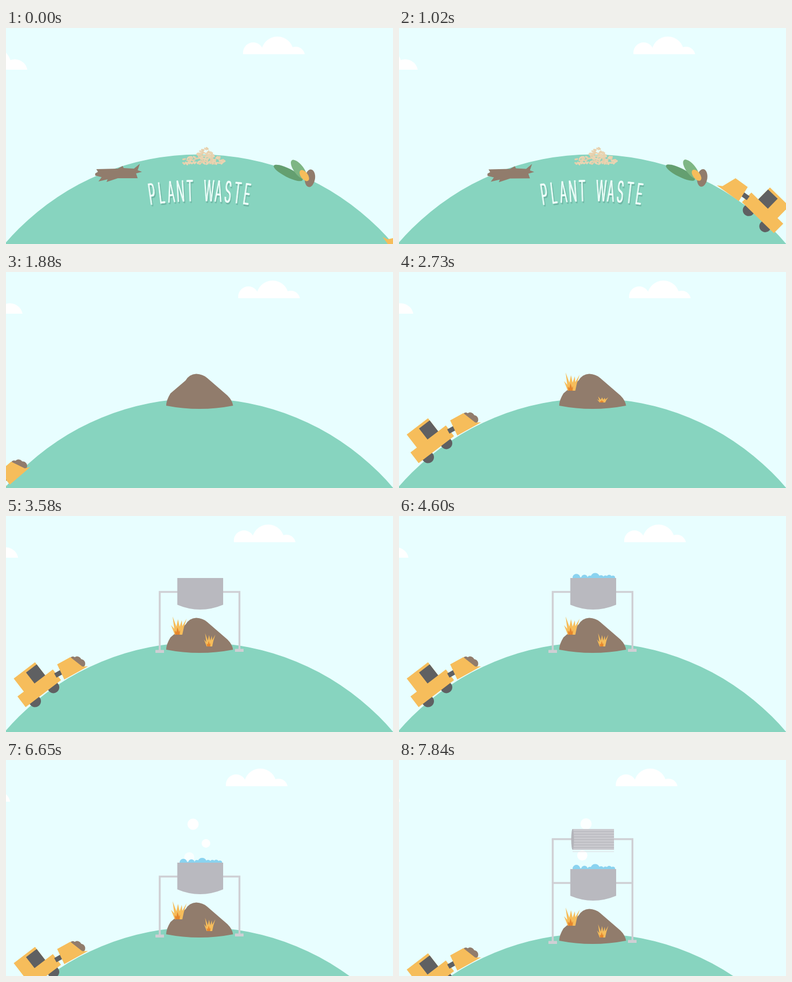
An HTML page with a canvas that plays this animation: 720x404 px, repeating every 8000 ms.

```html
<!DOCTYPE html>
<html lang="en">
<head>
<meta charset="utf-8">
<title>Plant waste</title>
<style>
  html, body { margin: 0; width: 100%; height: 100%; overflow: hidden; background: #e8feff; }
  canvas { display: block; width: 720px; height: 404px; }
</style>
</head>
<body>
<canvas id="stage" width="720" height="404"></canvas>
<script>
const ctx = document.getElementById('stage').getContext('2d');
const LOOP = 8000;
const GLOBE = { x: 359, y: 710, r: 473.6 };
const C = {
  sky: '#e8feff', hill: '#87d4bf', brown: '#917c6c', yellow: '#f6bd5b', orange: '#e5862d',
  dark: '#5f6062', pot: '#b9b9bf', stand: '#cfcfd4', water: '#8ad3f0', husk: '#ead4b2'
};

const clamp = v => Math.max(0, Math.min(1, v));
const span = (t, from, to) => clamp((t - from) / (to - from));
const easeOut = p => 1 - (1 - p) ** 2;
const easeInOut = p => p < 0.5 ? 4 * p ** 3 : 1 - (2 - 2 * p) ** 3 / 2;

function fill(color, path) {
  ctx.fillStyle = color;
  ctx.fill(new Path2D(path));
}

function rect(color, x, y, w, h) {
  ctx.fillStyle = color;
  ctx.fillRect(x, y, w, h);
}

function ellipse(color, x, y, rx, ry = rx, deg = 0) {
  ctx.fillStyle = color;
  ctx.beginPath();
  ctx.ellipse(x, y, rx, ry, deg * Math.PI / 180, 0, 2 * Math.PI);
  ctx.fill();
}

function group(draw) {
  ctx.save();
  draw();
  ctx.restore();
}

function shift(x, y, draw) {
  group(() => {
    ctx.translate(x, y);
    draw();
  });
}

function spin(deg, draw, x = GLOBE.x, y = GLOBE.y) {
  group(() => {
    ctx.translate(x, y);
    ctx.rotate(deg * Math.PI / 180);
    ctx.translate(-x, -y);
    draw();
  });
}

// Draws with the origin on the globe's surface, at an angle from its top.
function onSurface(deg, draw) {
  spin(deg, () => shift(GLOBE.x, GLOBE.y - GLOBE.r, draw));
}

function cloud(x, y, scale) {
  shift(x, y, () => {
    ctx.scale(scale, scale);
    ctx.beginPath();
    ctx.rect(-5, -50, 130, 50);
    ctx.clip();
    ellipse('#fff', 19, -3, 19);
    ellipse('#fff', 64, -3, 30);
    ellipse('#fff', 98, 3, 17);
  });
}

function huskPile() {
  let seed = 7;
  const random = () => (seed = seed * 16807 % 2147483647) / 2147483647;
  ctx.lineCap = 'round';
  ctx.lineWidth = 3;
  for (let i = 0; i < 115; i++) {
    const y = 225 + 29 * Math.sqrt(random());
    const half = y < 238 ? 5 + (y - 225) * 0.9 : Math.min(39, 17 + (y - 238) * 3);
    const x = 370 + (random() * 2 - 1) * half;
    const a = random() * Math.PI;
    ctx.strokeStyle = i % 3 ? C.husk : '#e6cfab';
    ctx.beginPath();
    ctx.moveTo(x - 2 * Math.cos(a), y - 1.5 * Math.sin(a));
    ctx.lineTo(x + 2 * Math.cos(a), y + 1.5 * Math.sin(a));
    ctx.stroke();
  }
}

function arcTitle(text) {
  const x = 360, baseline = 324, radius = 600;
  ctx.font = '300 55px Inter, Roboto, sans-serif';
  ctx.textAlign = 'center';
  for (const [color, dx, dy] of [['#70b7a5', 1.5, 3], ['#effffb', 0, 0]]) {
    ctx.fillStyle = color;
    [...text].forEach((letter, i) => spin((i - (text.length - 1) / 2) * 1.64, () => {
      // Two passes side by side thicken the stems of the condensed letters.
      for (const weight of [-0.7, 0.7]) shift(x + dx + weight, baseline + dy, () => {
        ctx.scale(0.36, 1);
        ctx.fillText(letter, 0, 0);
      });
    }, x, baseline + radius));
  }
}

function plantWaste() {
  fill(C.brown, 'M166 272L171 269 168 264 208 263 217 258 219 262 238 263 249 254 245 266 253 269 242 272 245 281 208 281 187 288 189 283 172 287 178 279 166 276Z');
  huskPile();
  ellipse('#649f70', 525, 271, 30, 8, 27);
  ellipse('#7eb684', 545, 265, 22, 9, 53);
  ellipse(C.brown, 565.5, 281, 9.5, 16.5, 8);
  ellipse(C.yellow, 555, 276, 12, 6.5, 53);
  arcTitle('PLANT WASTE');
}

function dozer(deg, facing, loaded) {
  onSurface(deg, () => {
    ctx.scale(facing, 1);
    ellipse(C.dark, -21.5, -1, 11);
    ellipse(C.dark, 21.5, -1, 11);
    rect(C.yellow, -42, -28, 83, 25);
    rect(C.yellow, -27, -59, 50, 32);
    rect(C.dark, -2, -54, 25, 26);
  });
  onSurface(deg + 8.5 * facing, () => {
    ctx.scale(facing, 1);
    rect(C.dark, -35, -21, 15, 9);
    if (loaded) {
      ellipse(C.brown, 8, -27, 5.5);
      ellipse(C.brown, 14, -21, 8);
      ellipse(C.brown, 17, -13, 8.5);
    }
    fill(C.yellow, 'M-24 -2L26.5 -2 17 -7 6 -33 -22 -33Z');
  });
}

function mound() {
  fill(C.brown, 'M298 250Q298 240 306 227L334 203Q341 191 354 190.5Q366 191 374 198L412 231Q421 240 422.5 250Q360 262 298 250Z');
}

function flame(x, y, scale, growth) {
  if (!growth) return;
  shift(x, y, () => {
    ctx.scale(scale, scale * growth);
    fill(C.yellow, 'M-7 0L-14 -18 -8 -11 -11 -34 -4 -15 -1 -29 2 -15 6 -27 7 -16 15 -30 10 -14 7 0Z');
    fill(C.orange, 'M-6 0L-7 -8 -4 -5 -2 -14 1 -5 3 -9 2 0Z');
  });
}

function water(level, t) {
  if (!level) return;
  group(() => {
    ctx.beginPath();
    ctx.rect(315, 95, 95, 22);
    ctx.clip();
    const bumps = [[330, 7], [345, 6], [355, 4], [365, 8.5], [376, 5], [384, 4.5], [391, 5], [398, 4]];
    bumps.forEach(([x, r], i) =>
      ellipse(C.water, x, 115.5 + 12 * (1 - level) + 0.4 * Math.sin(t / 260 + i * 2), r));
    rect(C.water, 323, 117 - 2.5 * level, 79, 3);
  });
}

function stand(path) {
  ctx.strokeStyle = C.stand;
  ctx.lineWidth = 3.5;
  ctx.lineCap = 'butt';
  ctx.stroke(new Path2D(path));
}

function cookingPot(t) {
  stand('M320 142H286V252M403 142H434.3V250');
  rect(C.stand, 278, 250.5, 16, 5.5);
  rect(C.stand, 426, 248.5, 16, 5.5);
  water(easeOut(span(t, 3750, 4300)), t);
  fill(C.pot, 'M318.7 116H404V166Q361 184 318.7 166Z');
}

function condenser(t) {
  const rise = easeOut(span(t, 7330, 7560));
  if (!rise) return;
  const top = 142 - 82 * rise;
  stand(`M286 142V${top}M434.3 142V${top}`);
  ctx.globalAlpha = span(t, 7480, 7800);
  stand('M322 60H284.3M399 60H436');
  rect('#cacacf', 323, 41, 77, 39);
  for (let y = 45; y < 80; y += 5) rect('#b9b9bf', 323, y, 77, 1.6);
  rect('#dcdce0', 323, 83, 77, 1);
  ellipse('#b4b4ba', 323, 60.5, 2.6, 19.5);
  ctx.globalAlpha = 1;
}

function steam(t) {
  const period = 1160;
  // x, radius, start of a rise
  const puffs = [[341, 9.5, 6600], [372, 8, 6345], [348, 10.5, 5690]];
  for (const [x, r, start] of puffs) {
    if (t < start) continue;
    const p = (t - start) / period % 1;
    ctx.globalAlpha = span(p, 0, 0.06) * (1 - span(p, 0.83, 1));
    ellipse('#fff', x, 188 - 70 * easeOut(p), r);
  }
  ctx.globalAlpha = 1;
}

function draw(t) {
  rect(C.sky, 0, 0, 720, 404);
  const drift = -0.0048 * t;
  cloud(441 + drift, 49, 1);
  cloud(-121 + drift, 78, 1.4);
  steam(t);

  const pan = 76 * easeInOut(span(t, 4950, 5950)) + 12 * easeOut(span(t, 7380, 7840));
  const turn = 85 * easeInOut(span(t, 1020, 1820));
  shift(0, pan, () => {
    ellipse(C.hill, GLOBE.x, GLOBE.y, GLOBE.r);
    if (turn < 85) {
      spin(-turn - 0.00018 * t, plantWaste);
      spin(-turn, () => shift(-25, -15, () => dozer(62 - 0.01725 * t, -1, false)));
    } else {
      const away = 1 - easeOut(span(t, 1700, 2700));
      shift(1 - 37 * away, 49 * away, () => dozer(-37.5 - 17.4 * away, 1, true));
    }
    if (turn) spin(85 - turn, mound);
    flame(321, 222, 1, easeOut(span(t, 2300, 2600)));
    flame(378.5, 244, 0.73, easeOut(span(t, 2620, 3050)));
    const drop = easeOut(span(t, 2800, 3550));
    if (drop) shift(0, -260 * (1 - drop), () => cookingPot(t));
    condenser(t);
  });
}

function tick() {
  draw(performance.now() % LOOP);
  requestAnimationFrame(tick);
}
tick();
</script>
</body>
</html>
```
